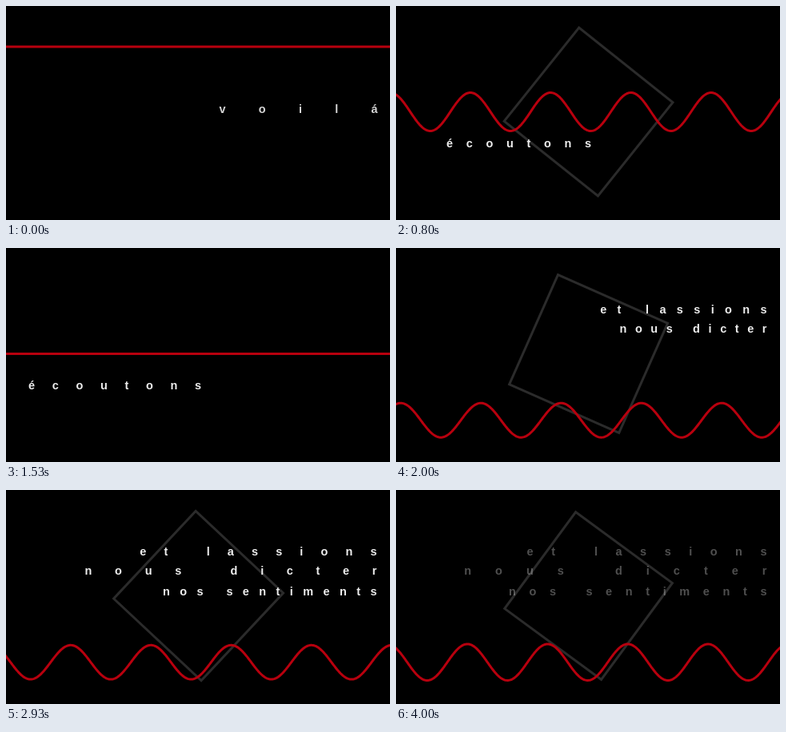
An HTML page with a canvas that plays this animation: 480 by 268 pixels, repeating every 4.07 s.

```html
<!DOCTYPE html>
<html lang="fr">
<head>
<meta charset="utf-8">
<style>
html, body { margin: 0; height: 100%; overflow: hidden; background: #000; }
canvas { display: block; }
</style>
</head>
<body>
<canvas id="stage" width="480" height="268"></canvas>
<script>
const ctx = document.getElementById('stage').getContext('2d');
const LOOP = 4070, BEAT = 1658, FIRST_BEAT = 50, WAVELENGTH = 100.3;

// Right-aligned lines whose tracking grows from zero towards a final left edge.
const lines = [
  { text: 'voilá', right: 464.5, y: 134, left: 266.5, start: -3000, end: 60, tau: 300, fade: [-20, 160] },
  { text: 'écoutons', right: 244, y: 177, left: 16, start: 130, end: 1700, tau: 538, fade: [1560, 1700] },
  { text: 'et lassions', right: 463.5, y: 81.5, left: 163.5, start: 1735, end: LOOP, tau: 295, fade: [3867, 4066] },
  { text: 'nous dicter', right: 463.5, y: 106, left: 84.5, start: 1846, end: LOOP, tau: 355, fade: [3867, 4066] },
  { text: 'nos sentiments', right: 463.5, y: 131.5, left: 139.5, start: 2530, end: LOOP, tau: 299, fade: [3867, 4066] }
];

const amplitude = [[0, 0], [150, 19], [234, 21.3], [634, 22.75], [750, 24], [1222, 21.75], [1420, 0], [BEAT, 0]];
const crest = [[0, -63], [800, 93], [2400, 378], [2933, 482], [3600, 619], [4000, 691], [LOOP, 704]];

const clamp = v => Math.max(0, Math.min(1, v));

function along(keys, t) {
  let i = 1;
  while (i < keys.length - 1 && t > keys[i][0]) i++;
  const [t0, a] = keys[i - 1], [t1, b] = keys[i];
  return a + (b - a) * clamp((t - t0) / (t1 - t0));
}

function drawSquare(beat) {
  const tilt = 45 * Math.exp(-beat / 385);
  ctx.save();
  ctx.globalAlpha = clamp(beat / 60) * clamp((1440 - beat) / 120);
  ctx.translate(240.6, 132.5);
  ctx.rotate((45 - tilt) * Math.PI / 180);
  ctx.strokeStyle = '#2b2b2b';
  ctx.lineWidth = 3;
  ctx.strokeRect(-75, -75, 150, 150);
  ctx.restore();
}

function drawWave(t, beat) {
  const mid = t < FIRST_BEAT ? 51 : t < FIRST_BEAT + BEAT ? 132.5 : 215.7;
  const amp = along(amplitude, beat), peak = along(crest, t);
  ctx.beginPath();
  for (let x = -2; x <= 482; x++) {
    ctx.lineTo(x, mid - amp * Math.cos((x - peak) * 2 * Math.PI / WAVELENGTH));
  }
  ctx.strokeStyle = '#b8000e';
  ctx.lineWidth = 3;
  ctx.stroke();
}

function drawLine(line, t) {
  if (t < line.start || t >= line.end) return;
  const chars = [...line.text];
  const widths = chars.map(c => ctx.measureText(c).width);
  const natural = widths.reduce((a, b) => a + b);
  const full = line.right - line.left;
  const width = full - (full - natural) * Math.exp((line.start - t) / line.tau);
  const gap = (width - natural) / (chars.length - 1);
  const [from, to] = line.fade;
  ctx.globalAlpha = clamp((to - t) / (to - from));
  let x = line.right - width;
  chars.forEach((c, i) => {
    ctx.fillText(c, x, line.y);
    x += widths[i] + gap;
  });
  ctx.globalAlpha = 1;
}

function draw(now) {
  // Motion advances at fifteen steps per second.
  const t = Math.floor((now % LOOP + 4) * 0.015) / 0.015;
  const beat = (t - FIRST_BEAT + BEAT) % BEAT;
  ctx.fillStyle = '#000';
  ctx.fillRect(0, 0, 480, 268);
  drawSquare(beat);
  drawWave(t, beat);
  ctx.font = 'bold 14.5px "Liberation Sans", Arial, sans-serif';
  ctx.fillStyle = '#eee';
  lines.forEach(line => drawLine(line, t));
}

const begin = performance.now();
function tick() {
  draw(performance.now() - begin);
  requestAnimationFrame(tick);
}
tick();
</script>
</body>
</html>
```
